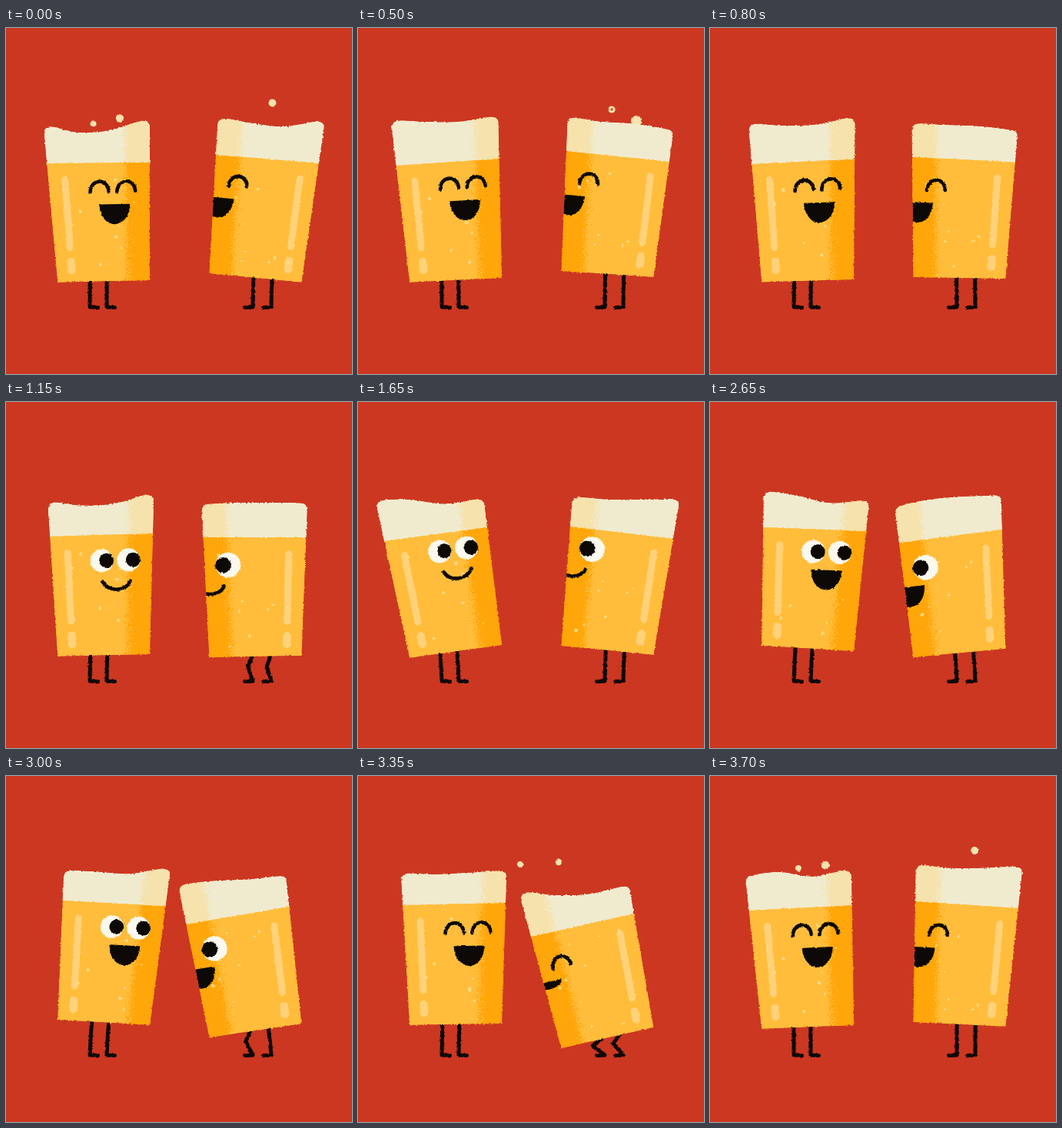
Recreate the animation shown at these times as an HTML page. Size 450 by 450 pixels, loop 3750 ms.

```html
<!DOCTYPE html>
<html lang="en">
<head>
<meta charset="utf-8">
<title>Two happy beers</title>
<style>
  html, body { margin: 0; width: 100%; height: 100%; overflow: hidden; background: #cc3721; }
  svg { display: block; width: 100vw; height: 100vh; }
</style>
</head>
<body>
<svg id="stage" viewBox="0 0 450 450">
  <defs>
    <filter id="rough" filterUnits="userSpaceOnUse" x="0" y="0" width="450" height="450" color-interpolation-filters="sRGB">
      <feTurbulence type="fractalNoise" baseFrequency=".35" numOctaves="2" seed="4"/>
      <feDisplacementMap in="SourceGraphic" scale="3" xChannelSelector="R" yChannelSelector="G"/>
    </filter>
    <filter id="grain" filterUnits="userSpaceOnUse" x="0" y="0" width="450" height="450" color-interpolation-filters="sRGB">
      <feTurbulence type="fractalNoise" baseFrequency=".9" numOctaves="1" seed="9"/>
      <feDisplacementMap in="SourceGraphic" scale="34" xChannelSelector="R" yChannelSelector="G"/>
    </filter>
  </defs>
  <rect width="450" height="450" fill="#cc3721"/>
  <g id="scene" filter="url(#rough)"></g>
</svg>
<script>
const LOOP = 3750, STEP = 50, INK = '#0d0907';
const scene = document.getElementById('scene');

// time, bottom y, bottom tilt, surface x, surface y, surface tilt, four foam heights, face shift
const LEFT = [
  [0, 329.5, -1.5, 120, 175.5, -.5, 48, 40, 43, 55, 0],
  [500, 328, -3, 116.5, 174.5, -4.5, 59, 55, 52, 55, -3],
  [1150, 329.5, -1.5, 124, 173, -2, 44, 39, 40, 50, 2],
  [1650, 324.5, -8.5, 101, 172, -9, 53, 49, 38, 38, -8],
  [2650, 320.5, 3.5, 136, 165.5, 2.5, 47, 43, 35, 39, -2],
  [3200, 321, 2, 139, 166, 3, 36, 38, 42, 52, 0],
  [3350, 323, -1, 125, 166.5, -1.5, 41, 39, 40, 41, 0],
  [3700, 326.5, -2.5, 117.5, 171.5, -3.5, 46, 48, 40, 45, -2]
];
const RIGHT = [
  [0, 325, 6, 340, 170.5, 5.5, 48, 45, 44, 54, 1],
  [500, 320, 4, 338, 167, 7, 44, 43, 45, 43, 2],
  [1150, 331, -1, 323.5, 176, 0, 43, 45, 45, 45, 5],
  [1650, 323, 6, 343, 170, 8, 39, 41, 46, 52, -5],
  [2650, 326.5, -5.5, 313, 174.5, -8.5, 49, 52, 50, 46, 6],
  [3200, 335, -11, 295, 187, -13, 56, 50, 42, 40, 8],
  [3350, 340.5, -13.5, 292, 194, -15, 59, 47, 39, 39, 10],
  [3700, 323, 3, 334, 167.5, 4.5, 47, 46, 49, 54, 4]
];
// time, x, y, speed x, speed y, radius
const DROPS = [
  [3350, 211, 115, -.05, -.12, 4], [3350, 261, 112, .06, -.12, 4.2],
  [3700, 115, 120, -.03, .06, 4], [3700, 150, 116, -.04, 0, 5.2],
  [3700, 344, 97, .05, -.02, 5], [500, 330, 106, .01, 0, 4.5], [500, 362, 121, .02, .06, 7]
];

const lerp = (a, b, k) => a + (b - a) * k;
const clamp = x => Math.max(0, Math.min(1, x));
const ramp = (t, a, b) => clamp((t - a) / (b - a));
const xy = p => p[0].toFixed(2) + ' ' + p[1].toFixed(2);
const poly = pts => 'M' + pts.map(xy).join('L') + 'Z';

function add(parent, tag, attrs = {}) {
  const el = document.createElementNS('http://www.w3.org/2000/svg', tag);
  set(el, attrs);
  return parent.appendChild(el);
}
function set(el, attrs) {
  for (const k in attrs) el.setAttribute(k, attrs[k]);
}

// Smooth cyclic curve through the keys
function pose(keys, t) {
  const n = keys.length;
  const at = i => {
    const turn = Math.floor(i / n), k = keys[i - turn * n];
    return [k[0] + turn * LOOP, ...k.slice(1)];
  };
  let i = n - 1;
  while (keys[i][0] > t) i--;
  const [a, b, c, d] = [at(i - 1), at(i), at(i + 1), at(i + 2)];
  const span = c[0] - b[0], s = (t - b[0]) / span, s2 = s * s, s3 = s2 * s;
  return b.slice(1).map((v, j) => {
    j++;
    const m = (c[j] - a[j]) / (c[0] - a[0]) * span;
    const q = (d[j] - b[j]) / (d[0] - b[0]) * span;
    return (2 * s3 - 3 * s2 + 1) * v + (s3 - 2 * s2 + s) * m + (3 * s2 - 2 * s3) * c[j] + (s3 - s2) * q;
  });
}

let seed = 7;
const rnd = () => (seed = seed * 16807 % 2147483647) / 2147483647;

function makeBeer(id, cfg) {
  const root = add(scene, 'g');
  const line = (w, color, parent) => add(parent, 'path', {
    fill: 'none', stroke: color, 'stroke-width': w, 'stroke-linecap': 'round', 'stroke-linejoin': 'round'
  });
  const part = (name, color) => {
    const clip = add(add(root, 'clipPath', { id: id + name }), 'path');
    const g = add(root, 'g', { 'clip-path': `url(#${id + name})` });
    return { clip, g, fill: add(g, 'path', { fill: color }) };
  };
  const legs = [line(5, INK, root), line(5, INK, root)];
  const beer = part('beer', '#ffbd3b');
  const beerShade = add(beer.g, 'path', { fill: '#ffa60a', filter: 'url(#grain)' });
  const bars = [line(9, '#ffd27a', beer.g), line(10.5, '#ffd27a', beer.g)];
  const bubbles = Array.from({ length: 9 }, () => ({
    el: add(beer.g, 'circle', { r: 1 + rnd() * 1.4, fill: '#ffdc85' }),
    u: rnd() * 1.6 - .8, v: rnd()
  }));
  const face = add(beer.g, 'g');
  const eyes = cfg.eyes.map(u => {
    const g = add(face, 'g'), open = add(g, 'g');
    add(open, 'circle', { r: cfg.eyeR, fill: '#fbf8ee' });
    add(open, 'circle', { r: cfg.eyeR * .63, cx: cfg.look, fill: INK });
    const shut = line(4.6, INK, g);
    set(shut, { d: 'M-12 7C-11 -11 11 -11 12 6' });
    return { g, u, open, shut };
  });
  const mouth = line(4.6, INK, face);
  const foam = part('foam', '#f0ebcf');
  const foamShade = add(foam.g, 'path', { fill: '#f5e2ac', filter: 'url(#grain)' });

  return t => {
    const [by, bt, mx, my, mt, h1, h2, h3, h4, shift] = pose(cfg.keys, t);
    const hop = t < 750 ? 4 * Math.sin(Math.PI * t / 250) ** 2 : 0;
    const P = (u, v) => [
      lerp(mx, cfg.x, v) + u * lerp(67, 60, v),
      lerp(my, by, v) + u * lerp(mt, bt, v) - hop
    ];
    const F = (u, h) => P(u, -h / 155);
    const tilt = Math.atan2((mt + bt) / 2, 64) * 180 / Math.PI;
    const place = (el, u, v) => {
      const p = P(u, v);
      set(el, { transform: `translate(${p[0]} ${p[1] + shift}) rotate(${tilt})` });
    };

    const body = poly([P(-1, -.03), P(1, -.03), P(1, 1), P(-1, 1)]);
    set(beer.clip, { d: body });
    set(beer.fill, { d: body });

    const top = [F(-1, h1 - 4), F(-.85, h1), F(-.35, h2), F(.25, h3), F(.85, h4), F(1, h4 - 3)];
    let d = `M${xy(P(-1, 0))}L${xy(F(-1, h1 - 10))}Q${xy(F(-1, h1))} ${xy(top[1])}`;
    for (let i = 1; i < 4; i++) {
      const [a, b, c, e] = top.slice(i - 1, i + 3);
      const c1 = [b[0] + (c[0] - a[0]) / 6, b[1] + (c[1] - a[1]) / 6];
      const c2 = [c[0] - (e[0] - b[0]) / 6, c[1] - (e[1] - b[1]) / 6];
      d += `C${xy(c1)} ${xy(c2)} ${xy(c)}`;
    }
    d += `Q${xy(F(1, h4))} ${xy(F(1, h4 - 8))}L${xy(P(1, 0))}Z`;
    set(foam.clip, { d });
    set(foam.fill, { d });

    const s = cfg.shade;
    const shade = (v0, v1) => poly([P(s * .53, v0), P(s * 1.4, v0), P(s * 1.4, v1), P(s * .53, v1)]);
    set(beerShade, { d: shade(-.15, 1.15) });
    set(foamShade, { d: shade(-.6, .15) });

    const bu = -s * .67;
    set(bars[0], { d: `M${xy(P(bu, .14))}L${xy(P(bu, .71))}` });
    set(bars[1], { d: `M${xy(P(bu, .83))}L${xy(P(bu, .9))}` });
    for (const b of bubbles) {
      const p = P(b.u, .1 + .82 * ((b.v - t / LOOP + 1) % 1));
      set(b.el, { cx: p[0], cy: p[1] });
    }

    const laugh = t < 850 || t >= 3100;
    for (const e of eyes) {
      place(e.g, e.u, .2);
      set(e.open, { display: laugh ? 'none' : 'inline' });
      set(e.shut, { display: laugh ? 'inline' : 'none' });
    }

    const wide = cfg.open(t);
    place(mouth, cfg.mouth, .35);
    if (wide < .08) {
      set(mouth, { d: 'M-18 4C-12 18 12 18 18 4', fill: 'none', 'stroke-width': 4.6 });
    } else {
      const k = 33 * wide;
      set(mouth, { d: `M-19 1L19 1C17 ${k} -17 ${k} -19 1Z`, fill: INK, 'stroke-width': 2 });
    }

    legs.forEach((leg, i) => {
      const ax = cfg.feet[i], ay = 363;
      const hx = ax + (mx - cfg.x) * .12 + cfg.dir;
      const hy = by + (hx - cfg.x) / 60 * bt - hop;
      const len = ay - hy;
      const bend = Math.sqrt(Math.max(0, cfg.leg ** 2 - len ** 2)) / 2;
      const knee = [(hx + ax) / 2 + cfg.dir * bend, hy + len * .42];
      set(leg, {
        d: `M${xy([hx, hy - 4])}L${xy([hx, hy])}L${xy(knee)}L${xy([ax, ay])}L${xy([ax + cfg.dir * 10.5, ay + .5])}`
      });
    });
  };
}

const drops = DROPS.map(() => add(scene, 'circle', { fill: '#f6e3ae' }));
const hole = add(scene, 'circle', { r: 1.6, fill: '#cc3721' });

const beers = [
  makeBeer('a', {
    keys: LEFT, x: 127, dir: 1, shade: 1, feet: [109, 131], leg: 33,
    eyes: [0, .53], eyeR: 15, look: 6, mouth: .29,
    open: t => t < 2200 ? 1 - ramp(t, 800, 950) : ramp(t, 2200, 2400)
  }),
  makeBeer('b', {
    keys: RIGHT, x: 324.5, dir: -1, shade: -1, feet: [321, 345], leg: 34,
    eyes: [-.53], eyeR: 16.3, look: -6.5, mouth: -.9,
    open: t => t < 2200 ? 1 - ramp(t, 800, 950)
      : ramp(t, 2200, 2400) - .65 * ramp(t, 3150, 3300) + .65 * ramp(t, 3400, 3600)
  })
];

function draw(t) {
  beers.forEach(f => f(t));
  DROPS.forEach(([t0, x, y, vx, vy, r], i) => {
    const dt = ((t - t0 + LOOP * 1.5) % LOOP) - LOOP / 2;
    const cx = x + vx * dt, cy = y + vy * dt + .0006 * dt * dt;
    const display = dt >= -150 && dt <= 220 ? 'inline' : 'none';
    set(drops[i], { cx, cy, r, display });
    if (i === 5) set(hole, { cx, cy, display });
  });
}

const start = performance.now();
function tick(now) {
  const t = Math.max(0, now - start) % LOOP;
  draw(Math.floor(t / STEP) * STEP);
  requestAnimationFrame(tick);
}
draw(0);
requestAnimationFrame(tick);
</script>
</body>
</html>
```
